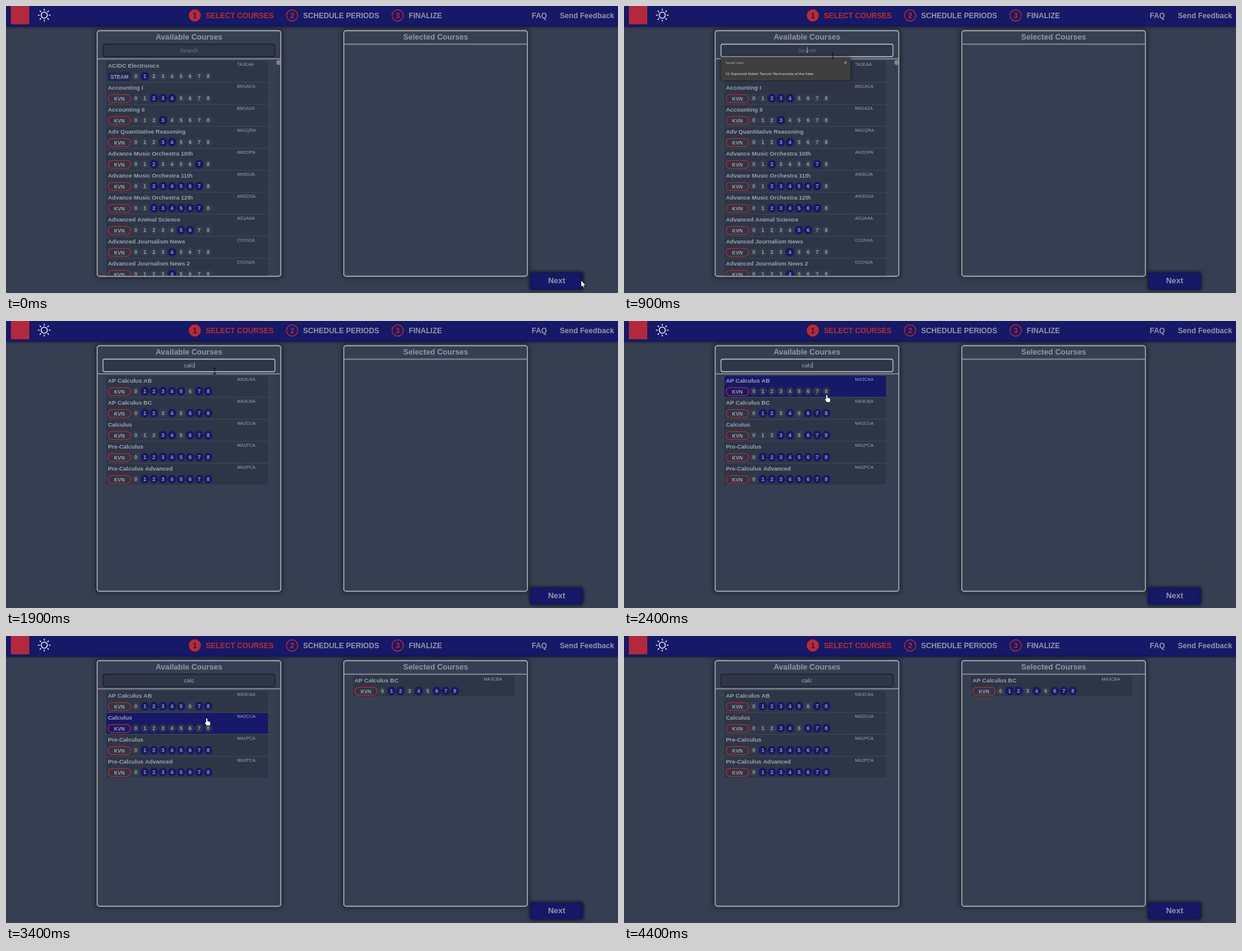
An HTML page with a canvas for the animation above (4900 ms loop, 1000x470 px).

```html
<!DOCTYPE html>
<html lang="en">
<head>
<meta charset="utf-8">
<title>Course picker</title>
<style>
  html, body { margin: 0; width: 100%; height: 100%; overflow: hidden; background: #363f51; }
  canvas { display: block; }
</style>
</head>
<body>
<canvas id="stage" width="1000" height="470"></canvas>
<script>
const ctx = document.getElementById('stage').getContext('2d');
const LOOP = 4900, STEP = 100;
const NAVY = '#161967', RED = '#bd2a2d', PAGE = '#363f51', ROW = '#2d3546',
      TEXT = '#9aa1ad', HEAD = '#9097a6', EDGE = '#969ba4';
const SANS = '"Liberation Sans", Arial, sans-serif', UI = '"Open Sans", sans-serif';

// title | code | open periods
const courses = `AC/DC Electronics|TA1EAA|1
Accounting I|BM1ACA|234
Accounting II|BM1A2A|3
Adv Quantitative Reasoning|MA1QRA|34
Advance Music Orchestra 10th|AM2OPA|27
Advance Music Orchestra 11th|AM3OJA|234567
Advance Music Orchestra 12th|AM3OSA|234567
Advanced Animal Science|AG1AAA|56
Advanced Journalism News|CO1N1A|4
Advanced Journalism News 2|CO1N2A|4
African American Studies|SS1ASA|23
Ag Mechanical-Metal Technology|AG1MMA|346
American Sign Language 1|FL1A1A|47
American Sign Language II|FL1A2A|12345678
American Sign Language III|FL1A3A|2
American Sign Language IV|FL1A4A|3
American Signlanguage III Adv.|FL2A3A|2
AP Calculus AB|MA3CAA|1234578
AP Calculus BC|MA3CBA|124678
Calculus|MA2CUA|34678
Pre-Calculus|MA1PCA|12345678
Pre-Calculus Advanced|MA2PCA|12345678`.split('\n').map(line => {
  const [title, code, periods] = line.split('|');
  return { title, code, periods, campus: code === 'TA1EAA' ? 'STEAM' : 'KVN' };
});
const picked = courses.find(c => c.code === 'MA3CBA');

const FOCUS = 700, MENU = 800, PICK = 3100, LEAVE = 4400;
const typing = [[1100, 'c'], [1300, 'ca'], [1500, 'cal'], [1700, 'calc']];
const thumbs = { '': 8, c: 14, ca: 119 };
const path = [[0, 940, 450], [700, 341, 82], [1100, 341, 82], [1300, 336, 77], [1600, 341, 82],
  [2000, 341, 82], [2600, 328, 135], [3500, 328, 135], [3800, 589, 123], [4400, 596, 128]];

const arrow = new Path2D('M0 0V9.5L2.2 7.5 3.6 10.8 5 10.2 3.6 7H6.6Z');
const hand = new Path2D('M2 6V1a1 1 0 0 1 2 0V4.5L8 5.5Q9 6 8.7 8L8 11.5H3L0 7.5Q.5 6 2 7Z');

function text(str, x, y, size, color, { weight = 'bold', align = 'left', font = SANS } = {}) {
  ctx.font = `${weight} ${size}px ${font}`;
  ctx.textAlign = align;
  ctx.fillStyle = color;
  ctx.fillText(str, x, y);
  return ctx.measureText(str).width;
}

function box(x, y, w, h, r, fill, stroke, line = 1) {
  ctx.beginPath();
  ctx.roundRect(x, y, w, h, r);
  if (fill) { ctx.fillStyle = fill; ctx.fill(); }
  if (stroke) { ctx.strokeStyle = stroke; ctx.lineWidth = line; ctx.stroke(); }
}

function shadowed(blur, draw) {
  ctx.save();
  ctx.shadowColor = 'rgba(0,0,0,.65)';
  ctx.shadowBlur = blur;
  draw();
  ctx.restore();
}

function circle(x, y, r, fill, stroke, line) {
  box(x - r, y - r, 2 * r, 2 * r, r, fill, stroke, line);
}

function header() {
  shadowed(5, () => box(0, 0, 1000, 34, 0, NAVY));
  box(8, 0, 30, 30, 0, '#b3283c');
  circle(62.5, 15, 5, null, '#e8eaf0', 1.6);
  ctx.lineCap = 'round';
  for (let i = 0; i < 8; i++) {
    const dx = Math.cos(i * Math.PI / 4), dy = Math.sin(i * Math.PI / 4);
    ctx.beginPath();
    ctx.moveTo(62.5 + 8 * dx, 15 + 8 * dy);
    ctx.lineTo(62.5 + 9.8 * dx, 15 + 9.8 * dy);
    ctx.stroke();
  }
  ['SELECT COURSES', 'SCHEDULE PERIODS', 'FINALIZE'].forEach((label, i) => {
    const x = [308.5, 467.5, 640][i], active = i === 0;
    circle(x, 15.5, 9.2, active ? RED : null, RED, 1.4);
    text(i + 1, x, 19.8, 12, active ? NAVY : RED, { align: 'center' });
    text(label, x + 18, 19.8, 12.1, active ? RED : HEAD);
  });
  text('FAQ', 859, 19.8, 12.1, HEAD);
  text('Send Feedback', 905, 19.8, 12.1, HEAD);
}

function panel(x, title, divider) {
  shadowed(9, () => box(x, 40.5, 300, 402, 4, PAGE, EDGE, 2));
  box(x, 40.5, 300, 402, 4, PAGE, EDGE, 1.8);
  box(x, divider - .8, 300, 1.6, 0, EDGE);
  box(x + 293.5, divider + 2, .8, 439 - divider, 0, '#2e3651');
  text(title, x + 150, 54.5, 12.65, HEAD, { align: 'center' });
}

function courseRow({ title, code, periods, campus }, x, y, hovered) {
  box(x, y, 264, 34, 2, hovered ? NAVY : ROW);
  text(title, x + 2.5, y + 11.2, 9.5, TEXT);
  text(code, x + 213.5, y + 7.8, 7.3, TEXT, { weight: 'normal' });
  const steam = campus === 'STEAM';
  box(x + 3.2, y + 19.2, 36, 12.6, steam ? 3 : 5, steam ? '#242b50' : null, steam ? '#1d235c' : RED, 1.3);
  text(campus, x + 21.3, y + 28.7, 8.4, TEXT, { align: 'center' });
  for (let n = 0; n < 9; n++) {
    const cx = x + 48 + n * 14.8, open = periods.includes(n);
    circle(cx, y + 25, 6.9, hovered ? '#2b3149' : open ? NAVY : '#343c4d');
    text(n, cx, y + 28, 8.5, TEXT, { align: 'center' });
  }
}

function search(query, focused) {
  box(158.5, 62.5, 281, 20.5, 3, '#2e3647', focused ? '#c3c7ce' : '#191f2c', 1.3);
  const w = text(query || 'Search', 299, 75.7, 9.5, query ? '#a4aab5' : '#6d7482',
    { weight: 'normal', align: 'center' });
  if (focused) box(query ? 299 + w / 2 : 299, 67.5, .8, 9.5, 0, '#c3c7ce');
}

function savedMenu(alpha) {
  ctx.save();
  ctx.globalAlpha = alpha;
  shadowed(5, () => box(158.5, 84, 211.5, 38, 3, '#3f3f40'));
  const plain = { weight: 'normal', font: UI };
  text('Saved data', 166, 95, 5.7, '#b9b9b9', plain);
  text('12. Raymond Aldwin Tascott: Penmanship of the Vales', 165.5, 113, 5.75, '#f0f0f0', plain);
  text('✕', 362, 95.2, 6.5, '#d0d0d0', { weight: 'normal', align: 'center', font: '"DejaVu Sans", sans-serif' });
  ctx.restore();
}

function pointerAt(t) {
  const i = path.findIndex(p => p[0] > t);
  if (i < 0) return path.at(-1).slice(1);
  const [t0, x0, y0] = path[i - 1], [t1, x1, y1] = path[i];
  const k = (t - t0) / (t1 - t0), e = k * k * (3 - 2 * k);
  return [x0 + (x1 - x0) * e, y0 + (y1 - y0) * e];
}

function pointer(x, y, kind) {
  ctx.save();
  ctx.translate(x, y);
  ctx.lineWidth = 1;
  if (kind === 'beam') {
    ctx.strokeStyle = '#0c0f16';
    ctx.stroke(new Path2D('M-2 -4.5H2M0 -4.5V4.5M-2 4.5H2'));
  } else {
    const shape = kind === 'hand' ? hand : arrow;
    if (kind === 'hand') ctx.translate(-3, 0);
    ctx.strokeStyle = '#10131c';
    ctx.fillStyle = '#fff';
    ctx.stroke(shape);
    ctx.fill(shape);
  }
  ctx.restore();
}

function render(t) {
  const query = typing.reduce((q, [at, value]) => t >= at ? value : q, '');
  const chosen = t >= PICK;
  const list = courses.filter(c => c.title.toLowerCase().includes(query) && !(chosen && c === picked));
  const [px, py] = pointerAt(t);
  const visible = t < LEAVE;
  const hover = visible && px > 164 && px < 428 && py > 90 ? Math.floor((py - 90) / 36) : -1;

  box(0, 0, 1000, 470, 0, PAGE);
  header();
  panel(149, 'Available Courses', 86.5);
  panel(552, 'Selected Courses', 62.5);
  search(query, t >= FOCUS && !chosen);

  ctx.save();
  ctx.beginPath();
  ctx.rect(150, 88, 298, 353.5);
  ctx.clip();
  list.slice(0, 10).forEach((c, i) => courseRow(c, 164, 90 + 36 * i, i === hover));
  if (query in thumbs) box(442, 88.5, 6.5, thumbs[query], 3, '#7f858f');
  ctx.restore();

  if (chosen) courseRow(picked, 567, 65, false);
  if (t >= MENU && t < 1400) savedMenu(t < 1200 ? 1 : t < 1300 ? .3 : .06);

  shadowed(5, () => box(856, 436, 87, 28.5, 4, NAVY, '#1d2350'));
  text('Next', 899.7, 454.3, 12.9, HEAD, { align: 'center' });

  if (visible) {
    const inSearch = px > 158 && px < 440 && py > 62 && py < 84;
    const released = t >= 1200 && t < 1500;
    const kind = inSearch && !released ? 'beam' : hover >= 0 && hover < list.length ? 'hand' : 'arrow';
    pointer(px, py, kind);
  }
}

function tick() {
  render(Math.floor(performance.now() % LOOP / STEP) * STEP);
  requestAnimationFrame(tick);
}
tick();
</script>
</body>
</html>
```
